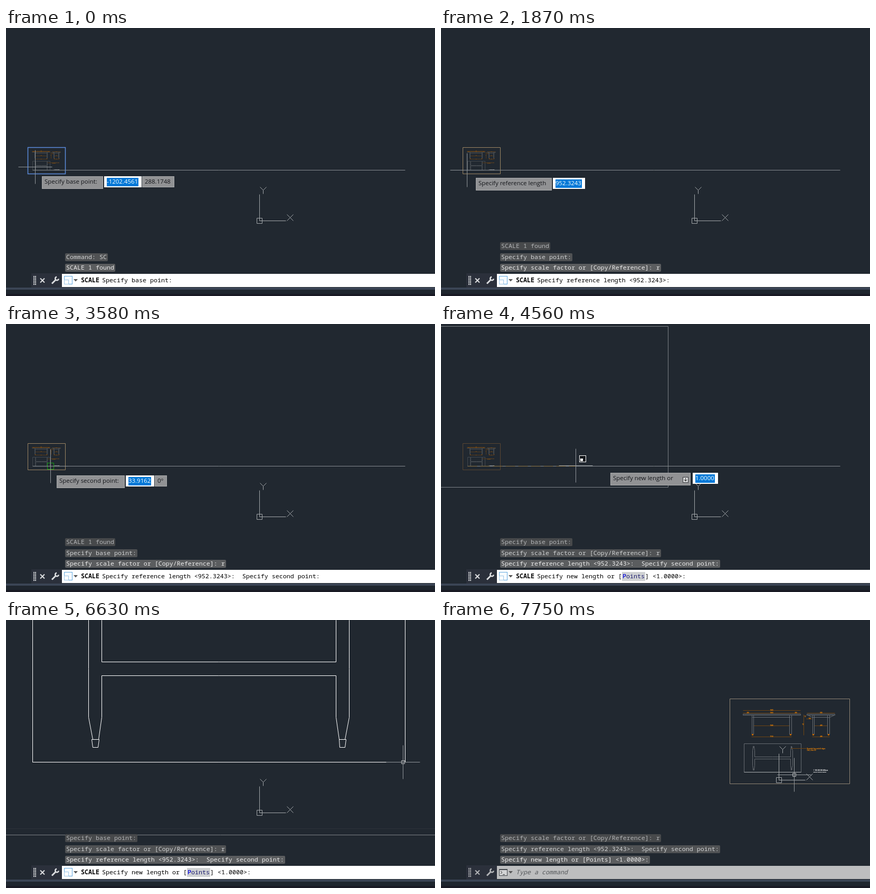
Recreate the animation shown at these times as an HTML page with a canvas. Size 813 by 508 pixels, loop 8 s.

```html
<!DOCTYPE html>
<html lang="en">
<head>
<meta charset="utf-8">
<title>Scale by reference</title>
<style>
html, body { margin: 0; width: 100%; height: 100%; overflow: hidden; background: #212830; }
canvas { display: block; }
</style>
</head>
<body>
<canvas id="stage" width="813" height="508"></canvas>
<script>
const c = document.getElementById('stage').getContext('2d');
const MONO = '11.667px "Noto Sans Mono", monospace';
const UI = '11.45px "Open Sans", sans-serif';
const CHAR = 7;
const BASE = [50.2, 269.5], LENGTH = 706;
const FULL = LENGTH / 108, SMALL = 0.0476;   // sheet scales
const ZOOM_AT = [669, 292.5];

// The screen refreshes in bursts: [first, last, refreshes]
const bursts = [[0, 0, 1], [120, 360, 3], [1040, 1040, 1], [1320, 1320, 1], [1750, 2770, 9],
  [2920, 3580, 6], [4140, 5130, 8], [5280, 6210, 8], [6360, 7050, 6], [7360, 7750, 4]];
const refreshes = bursts.flatMap(([a, b, n]) =>
  Array.from({ length: n }, (_, i) => Math.floor((a + (b - a) * i / Math.max(1, n - 1)) / 10) * 10));

// time, crosshair x y, tooltip x y
const track = [
  [0, 55, 263, 68, 281], [360, 49, 269, 66, 284], [2370, 49, 269, 66, 284],
  [2510, 50, 268, 66, 284], [2770, 68, 267, 80, 286], [3580, 84, 269, 96, 287],
  [4140, 92, 268, 110, 286], [4560, 255, 268, 321, 282], [5130, 560, 264, 610, 280],
  [5540, 696, 261, 735, 279], [5940, 756, 269, 768, 285], [6360, 756, 269, 768, 285],
  [6630, 752, 269, 768, 285], [7050, 669, 293, 768, 285], [8000, 669, 293, 768, 285]];

const history = ['Command: SC', 'SCALE 1 found', 'Specify base point:',
  'Specify scale factor or [Copy/Reference]: r',
  'Specify reference length <952.3243>:  Specify second point:',
  'Specify new length or [Points] <1.0000>:'];

// time, prompt, history length, tooltip, tooltip values
const REF = 'Specify reference length <952.3243>:';
const FACTOR = 'Specify scale factor or [Copy Reference]:';
const SECOND = REF + '  Specify second point:';
const states = [
  [0, 'Specify base point:', 2, 'Specify base point:', ['-1202.4561', '288.1748']],
  [1040, 'Specify base point:', 2, 'Endpoint', []],
  [1320, FACTOR, 3, 'Specify scale factor or', ['1.0000']],
  [1750, FACTOR + ' r', 3, 'Specify scale factor or', ['r']],
  [1870, REF, 4, 'Specify reference length', ['952.3243']],
  [2130, SECOND, 4],
  [2770, SECOND, 4, 'Specify second point:', ['33.9162', '0°']],
  [4140, history[5], 5, 'Specify new length or', ['1.0000']],
  [6360, history[5], 5],
  [6760, '', 6]];

const snap = v => Math.floor(v) + 0.5;

function line(points, color, width = 1, close = false) {
  c.beginPath();
  points.forEach(([x, y]) => c.lineTo(x, y));
  if (close) c.closePath();
  c.strokeStyle = color;
  c.lineWidth = width;
  c.stroke();
}

function box(x, y, w, h, fill, border) {
  c.fillStyle = fill;
  c.fillRect(x, y, w, h);
  if (border) {
    c.strokeStyle = border;
    c.lineWidth = 1;
    c.strokeRect(x + 0.5, y + 0.5, w - 1, h - 1);
  }
}

function square(x, y, r, color) {
  line([[x - r, y - r], [x + r, y - r], [x + r, y + r], [x - r, y + r]], color, 1, true);
}

function text(str, x, y, color, font) {
  c.font = font;
  c.fillStyle = color;
  c.fillText(str, x, y);
}

function cursorAt(t) {
  const i = Math.max(1, track.findIndex(k => k[0] > t));
  const a = track[i - 1], b = track[i], p = (t - a[0]) / (b[0] - a[0]);
  return a.map((v, j) => v + (b[j] - v) * p).slice(1);
}

// Sheet units: the table plan is 108 wide with its lower left corner at (574.5, 289.5)
function sheet([bx, by], scale, border, borderWidth, details = true) {
  const at = ([x, y]) => [snap(bx + (x - 574.5) * scale), snap(by + (y - 289.5) * scale)];
  const draw = (pts, color, close) => line(pts.map(at), color, 1, close);
  const rect = (x, y, x2, y2, color) => draw([[x, y], [x2, y], [x2, y2], [x, y2]], color, true);
  line([[548, 150], [775, 150], [775, 310.55], [548, 310.55]].map(at), border, borderWidth, true);
  if (!details) return;

  const large = scale > 0.8;
  const ink = scale > 3 ? '#fff' : large ? '#666b71' : '#42484e';
  const dimInk = large ? '#6e4413' : '#553a1b', orange = large ? '#ff8c00' : '#c06c08';
  const label = (str, x, y, color = orange) => {
    const [px, py] = at([x, y]);
    text(str, px, py, color, `bold ${Math.max(2.6 * scale, 1)}px "Open Sans", sans-serif`);
  };
  const dim = (x, x2, y, str) => {
    draw([[x, y], [x2, y]], dimInk);
    c.textAlign = 'center';
    label(str, (x + x2) / 2, y - 0.6);
    c.textAlign = 'left';
  };

  // plan, mirrored both ways about its centre
  rect(574.5, 235.3, 682.5, 289.5, ink);
  for (const mx of [-1, 1]) for (const my of [-1, 1]) {
    const part = (pts, close) => draw(pts.map(([x, y]) => [628.55 + mx * x, 262.4 + my * y]), ink, close);
    part([[37.8, 0], [37.8, 14.1], [36.6, 20.5], [34.9, 20.5], [33.9, 14.1], [33.9, 2], [0, 2]]);
    part([[36.8, 20.5], [36.5, 22.8], [35.1, 22.8], [34.8, 20.5]], true);
  }

  // front and side elevations
  for (const [mid, top, leg] of [[627, 54.5, 36], [720.5, 26.5, 14.5]]) {
    const front = leg > 20;
    rect(mid - top, 179, mid + top, 180.6, ink);
    draw([[mid - leg, 185.5], [mid + leg, 185.5]], ink);
    dim(mid - leg + 2, mid + leg - 2, 201.5, front ? '1040' : '400');
    dim(mid - leg - 2, mid + leg + 2, 222.5, front ? '1150' : '480');
    dim(mid - top, mid + top, 177.5, front ? '1060' : '800');
    for (const m of [-1, 1]) {
      draw([[mid + m * (leg - 2), 181], [mid + m * (leg - 2), 217], [mid + m * (leg + 1.8), 217],
        [mid + m * (leg + 1.8), 181]], ink);
      if (!front) draw([[mid + m * 25, 181], [mid + m * leg, 186]], ink);
      const [fx, fy] = at([mid + m * leg, 218.5]);
      c.fillStyle = '#c96a00';
      c.fillRect(fx - 1.6 * scale, fy - 1.4 * scale, Math.max(1, 3.2 * scale), Math.max(1, 2.6 * scale));
    }
  }
  dim(572.5, 681.5, 172.5, '1600');
  dim(572.5, 591, 177.5, '280');
  dim(663, 681.5, 177.5, '280');
  dim(693, 704, 188.5, '150');
  draw([[688, 180], [688, 219]], dimInk);
  label('72', 685, 199);
  label('12', 688.5, 184);

  // notes
  draw([[664, 244], [693, 244]], dimInk);
  label('Rounded legs and all edges', 693.5, 245);
  label('Oak, clear oil', 693.5, 248);
  label('1  100 200 300 400mm', 705.5, 286.5, '#fff');
  label('▬▬▬ ▬▬▬ ▬▬▬', 705.5, 289.5, '#fff');
}

function axes(x, y) {
  const color = '#a3a7aa', l = pts => line(pts.map(([a, b]) => [x + a, y + b]), color);
  l([[0, -50], [0, 0], [50, 0]]);
  square(x, y, 5, color);
  l([[1, -64], [7, -58], [7, -51]]);
  l([[13, -64], [7, -58]]);
  l([[52, -12], [64, 0]]);
  l([[64, -12], [52, 0]]);
}

function crosshair(x, y, pickbox, badge) {
  x = snap(x); y = snap(y);
  line([[x - 32, y], [x + 32, y]], '#92979b');
  line([[x, y - 32], [x, y + 32]], '#92979b');
  if (pickbox) square(x, y, 3, '#b5b8ba');
  if (badge) {
    box(x + 6.5, y - 19.5, 13, 13, '#15181c', '#fff');
    box(x + 8.5, y - 13.5, 5, 5, '#fff');
  }
}

function tooltip(str, values, x, y) {
  x = Math.round(x); y = Math.round(y);
  c.font = UI;
  const options = str.endsWith(' or');
  const w = Math.round(c.measureText(str).width) + (options ? 38 : values.length ? 16 : 13);
  box(x, y, w, values.length ? 24 : 21, '#919294', '#aaabac');
  text(str, x + 5, y + 11, '#14161a', UI);
  if (options) {
    const ix = x + w - 15;
    box(ix, y + 8, 11, 11, '#d4d5d6', '#3a3c40');
    line([[ix + 5.5, y + 10], [ix + 5.5, y + 16]], '#222');
    line([[ix + 3, y + 13], [ix + 5.5, y + 16], [ix + 8, y + 13]], '#222');
  }
  x += w + (options ? 4 : 2);
  values.forEach((v, i) => {
    c.font = UI;
    const tw = Math.round(c.measureText(v).width);
    box(x, y, tw + 12, 21, i ? '#919294' : '#fff', i ? '#aaabac' : '#fff');
    if (!i) box(x + 5, y + 3, tw + 1, 16, '#0078d7');
    text(v, x + 5, y + 11, i ? '#14161a' : '#fff', UI);
    x += tw + 13;
  });
}

// Options in square brackets become clickable chips
function promptText(prompt, x) {
  let inside = false;
  for (const part of prompt.split(/(?<=\[)|(?=\])|(?<=\[\w+)(?= )|(?<=\[\w+ )/)) {
    if (part[0] === ']') inside = false;
    const width = part.length * CHAR;
    if (inside && part.trim()) {
      box(x, 470, width + 2, 17, '#cfd1d3');
      text(part, x + 1, 478.5, '#1c1c6e', MONO);
      text(part[0], x + 1, 478.5, '#0000f0', MONO);
      x += 2;
    } else {
      text(part, x, 478.5, '#000', MONO);
    }
    x += width;
    if (part.endsWith('[')) inside = true;
  }
}

function commandLine(prompt, count) {
  history.slice(0, count).slice(-3).reverse().forEach((str, i) => {
    const y = 454.5 - 20.3 * i;
    c.fillStyle = ['#5b5d5f', '#505254', '#47494b'][i];
    c.beginPath();
    c.roundRect(112, Math.round(y - 7.5), str.length * CHAR + 4, 15, 2);
    c.fill();
    text(str, 114, y, ['#ececec', '#cfd1d2', '#b2b4b6'][i], MONO);
  });

  const icon = prompt ? '#dcdee0' : '#b2b4b7';
  box(48, 465, 58, 27, '#2b303b');
  for (let i = 0; i < 12; i++) box(52 + i % 2 * 3, 470 + (i >> 1) * 3, 2, 2, icon);
  line([[65, 474.5], [73, 482.5]], icon, 2);
  line([[73, 474.5], [65, 482.5]], icon, 2);
  line([[87, 484.5], [95, 476.5]], icon, 3);
  c.beginPath();
  c.arc(96.5, 475, 3.2, 0.1, 4.6);
  c.lineWidth = 2.6;
  c.stroke();

  box(106, 466, 707, 25, prompt ? '#fff' : '#bdbebf');
  box(0, 492, 813, 4, '#3b4555');
  box(0, 496, 813, 8, '#1f262e');
  box(0, 504, 813, 4, '#191a24');
  c.fillStyle = '#555';
  c.beginPath();
  c.moveTo(128, 476); c.lineTo(136, 476); c.lineTo(132, 480.5);
  c.fill();

  if (!prompt) {
    box(110, 472, 16, 13, '#d3d4d5', '#44484d');
    box(110, 472, 16, 2, '#44484d');
    line([[113, 476], [116, 478.5], [113, 481]], '#333');
    line([[117, 482.5], [121, 482.5]], '#333');
    text('Type a command', 142, 478.5, '#55585b', 'italic ' + MONO);
    return;
  }
  box(110, 470, 16, 16, '#f7fbff', '#62a9de');
  box(110, 477, 9, 9, '#fff', '#9cc6e6');
  text('SCALE', 142, 478.5, '#000', 'bold ' + MONO);
  promptText(prompt, 182);
}

function render(time) {
  const t = refreshes.findLast(r => r <= time);
  const [, prompt, count, tip, values] = states.findLast(s => s[0] <= t);
  const [x, y, tipX, tipY] = cursorAt(t);
  const scaled = t >= 6360, dragging = t >= 4140 && !scaled, snapped = t >= 5540;
  const zoom = t < 7360 ? 1 : FULL ** (-(t - 7230) / 520);
  const view = p => p.map((v, i) => ZOOM_AT[i] + (v - ZOOM_AT[i]) * zoom);
  const base = view(BASE);

  c.textBaseline = 'middle';
  box(0, 0, 813, 508, '#212830');

  const border = zoom < 1 ? '#8f8474' : scaled ? '#7c8186'
    : t < 1870 ? '#5b8bdc' : t < 4140 ? '#9b8563' : '#594632';
  sheet(base, FULL * zoom * (scaled ? 1 : SMALL), border, t < 1870 ? 1.5 : 1);
  if (dragging) {
    sheet(BASE, FULL * (snapped ? 1 : (x + 0.5 - BASE[0]) / LENGTH) * 0.998, '#7c8186', 1, false);
  }
  if (scaled && t < 6760) line([[0, 395.5], [813, 395.5]], '#2d3239');

  const end = view([756, BASE[1]]);
  line([[snap(base[0]), snap(base[1])], [snap(end[0]), snap(end[1])]],
    scaled ? (zoom < 1 ? '#a9adb0' : '#fff') : '#878c90');
  if (dragging) {
    c.setLineDash([18, 6]);
    line([[snap(base[0]), snap(base[1])], [x, snap(base[1])]], '#8f7646');
    c.setLineDash([]);
  }
  axes(...view([480.5, 365.5]).map(snap));

  if (t >= 360 && t < 1320) square(49.5, 269.5, 6, '#2f6350');
  if (t >= 3580 && t < 4140) square(84.5, 269.5, 6, '#14a014');
  if (snapped && !scaled) square(756, 269.5, 6, '#108c18');
  crosshair(x, y, scaled, dragging || t >= 1320 && t < 1870);
  commandLine(prompt, count);
  if (tip) tooltip(tip, values, tipX, tipY);
}

function tick() {
  render(performance.now() % 8000);
  requestAnimationFrame(tick);
}
tick();
</script>
</body>
</html>
```
